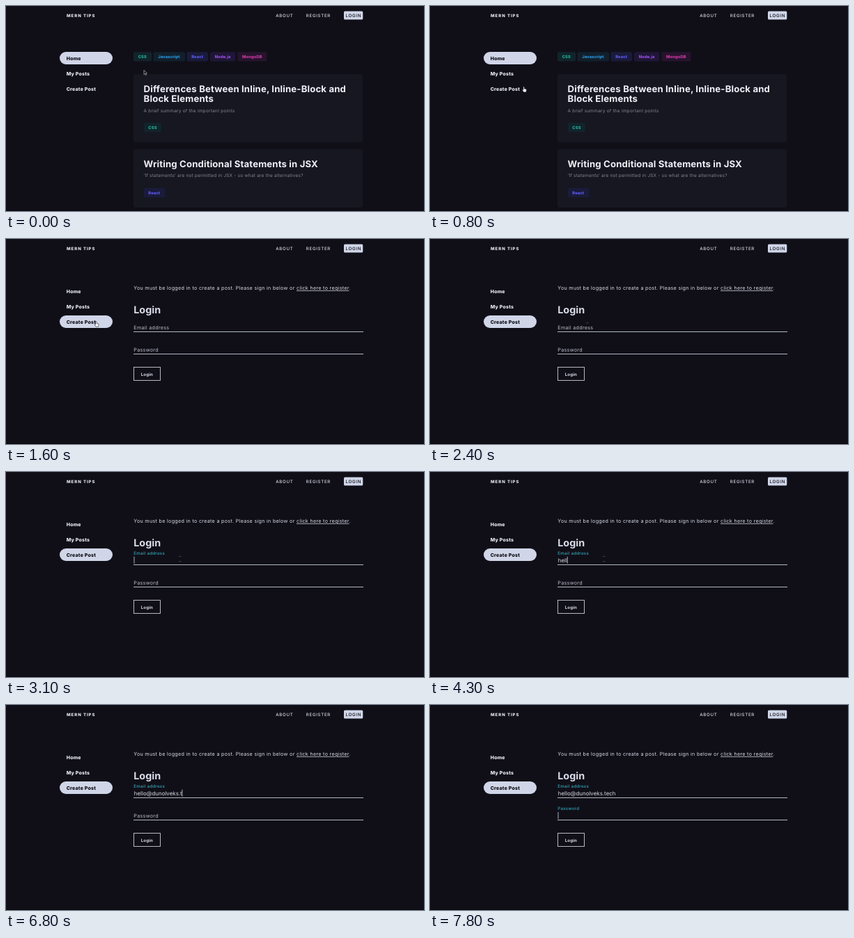
Animation, 600 px wide and 295 px high, one loop 8000 ms. Source, as an HTML page:

```html
<!DOCTYPE html>
<html lang="en">
<head>
<meta charset="utf-8">
<title>MERN Tips</title>
<style>
  html, body { margin: 0; width: 100%; height: 100%; overflow: hidden; background: #100f18; }
  svg { display: block; width: 100%; height: 100%; }
  text { font: 400 7.2px Inter, sans-serif; letter-spacing: .29px; fill: #d8dbe7;
         text-rendering: geometricPrecision; white-space: pre; }
  .brand { font-size: 6px; font-weight: 800; letter-spacing: .95px; fill: #e6e8f2; }
  .menu { font-size: 6.2px; font-weight: 500; letter-spacing: .68px; }
  .nav { font-size: 7px; font-weight: 800; letter-spacing: .2px; fill: #e9ebf5; }
  .title { font-size: 13.2px; font-weight: 700; letter-spacing: .14px; fill: #eef0fa; }
  .sub { font-size: 6.5px; letter-spacing: .21px; fill: #858792; }
  .tag { font-size: 5.8px; font-weight: 800; letter-spacing: .1px; }
  .heading { font-size: 14.4px; font-weight: 700; letter-spacing: 0; }
  .button { font-size: 6.1px; font-weight: 700; letter-spacing: .15px; }
  .typed { font-size: 7.95px; letter-spacing: 0; }
  .link { text-decoration: underline; text-decoration-thickness: .6px; }
  .dark { fill: #0c0b13; }
  .card { fill: #161720; }
  .light { fill: #d0d6e8; }
  .line { fill: #b4b7c4; }
  .pointer { stroke-linejoin: round; }
  #arrow { fill: #0b0b10; stroke: #d4d4da; stroke-width: .6; }
  #hand { fill: #f2f2f6; stroke: #23232c; stroke-width: .6; }
  #beam { fill: none; stroke: #4c4c58; stroke-width: .8; }
</style>
</head>
<body>
<svg viewBox="0 0 600 295">
  <rect width="600" height="295" fill="#100f18"/>
  <rect y="294" width="600" height="1" fill="#050508"/>

  <text class="brand" x="87" y="16">MERN TIPS</text>
  <text class="menu" x="387.3" y="16.1">ABOUT</text>
  <text class="menu" x="430.8" y="16.1">REGISTER</text>
  <rect class="light" x="485" y="7.6" width="27.3" height="12" rx="1.5"/>
  <text class="menu dark" x="487.6" y="16">LOGIN</text>

  <rect class="light" id="pill" x="77" width="76" height="18" rx="9"/>
  <text class="nav" id="home" x="86.7" y="77.7">Home</text>
  <text class="nav" x="86.7" y="99.7">My Posts</text>
  <text class="nav" id="create" x="86.7" y="121.7">Create Post</text>

  <g id="postsPage">
    <rect class="card" x="183" y="98" width="329" height="98" rx="2"/>
    <text class="title" x="197.6" y="124">Differences Between Inline, Inline-Block and</text>
    <text class="title" x="197.6" y="137.5">Block Elements</text>
    <text class="sub" x="197.6" y="152.8">A brief summary of the important points</text>
    <rect class="card" x="183" y="206" width="329" height="84" rx="2"/>
    <text class="title" x="197.6" y="231.5">Writing Conditional Statements in JSX</text>
    <text class="sub" x="197.6" y="246.3">‘If statements’ are not permitted in JSX - so what are the alternatives?</text>
    <g id="tags"></g>
  </g>

  <g id="loginPage">
    <text x="183.3" y="73.2">You must be logged in to create a post. Please sign in below or <tspan class="link">click here to register</tspan>.</text>
    <text class="heading" x="183.2" y="107">Login</text>
    <text id="emailLabel" x="183.3">Email address</text>
    <text class="typed" id="email" x="183.8" y="130"></text>
    <rect class="line" x="183" y="133" width="330" height="1"/>
    <text id="passwordLabel" x="183.3">Password</text>
    <rect class="line" x="183" y="165" width="330" height="1"/>
    <rect class="light" id="caret" width=".8" height="10"/>
    <rect x="183.5" y="184.5" width="38" height="19" fill="none" stroke="#c9ccd8" stroke-width=".9"/>
    <text class="button" x="193.7" y="196.7">Login</text>
  </g>

  <g id="cursor">
    <path class="pointer" id="arrow" d="M0 0V6.4L1.5 5.1L2.5 7.3L3.5 6.8L2.6 4.7H4.5Z"/>
    <path class="pointer" id="hand" d="M-1.7 -3.4Q-.9 -4.2 -.2 -3.4V-.9L2.3 -.3Q3 0 2.9 .9L2.3 4H-1.2L-3.2 .9Q-3.1 -.1 -2.3 .4L-1.7 1Z"/>
    <path id="beam" d="M-1.8 -3.6H1.8M-1.8 3.6H1.8"/>
  </g>
</svg>
<script>
const LOOP = 8000, OPEN_LOGIN = 1600, FOCUS_EMAIL = 2870, FOCUS_PASSWORD = 7380, BLINK = 500;
const EMAIL = 'hello@dunolveks.tech';
const KEY_TIMES = [3800, 4000, 4100, 4300, 4500, 5000, 5400, 5500, 5600, 5700,
                   5800, 5900, 6000, 6050, 6100, 6500, 6800, 6900, 7000, 7100];
const TAG_COLORS = {
  CSS: { text: '#22b59b', back: '#12242b' },
  Javascript: { text: '#2d9ae2', back: '#11202d' },
  React: { text: '#605cf2', back: '#1a1b3c' },
  'Node.js': { text: '#a24ff2', back: '#1f1637' },
  MongoDB: { text: '#cf3ba8', back: '#26132c' },
};

const el = id => document.getElementById(id);
const clamp = v => Math.max(0, Math.min(1, v));
const progress = (t, from, to) => clamp((t - from) / (to - from));
const easeInOut = p => p < .5 ? 4 * p ** 3 : 1 - (2 - 2 * p) ** 3 / 2;
const mix = (a, b, p) => a + (b - a) * p;
const show = (id, on) => el(id).setAttribute('visibility', on ? 'inherit' : 'hidden');

function addTag(name, x, y, width) {
  const { text, back } = TAG_COLORS[name];
  el('tags').innerHTML +=
    `<rect x="${x}" y="${y}" width="${width}" height="13.4" rx="2" fill="${back}"/>
     <text class="tag" x="${x + 6.7}" y="${y + 8.9}" style="fill:${text}">${name}</text>`;
}
addTag('CSS', 183, 66.2, 26);
addTag('Javascript', 211.5, 66.2, 45.5);
addTag('React', 259.5, 66.2, 30.5);
addTag('Node.js', 293, 66.2, 36.3);
addTag('MongoDB', 332.3, 66.2, 42.2);
addTag('CSS', 197.6, 168.2, 25.5);
addTag('React', 197.6, 261.8, 30.7);

// Floating label: shrinks and rises once its field has focus.
function floatLabel(id, restY, t, focus) {
  const p = 1 - (1 - progress(t, focus, focus + 250)) ** 2;
  const label = el(id);
  label.setAttribute('y', mix(restY, restY - 10.8, p));
  label.style.fontSize = mix(7.2, 6.15, p) + 'px';
  label.style.fontWeight = p > 0 ? 500 : 400;
  label.style.fill = p > 0 ? '#36a6ba' : '#b9bcc9';
}

function drawCaret(t, typedCount) {
  const inPassword = t >= FOCUS_PASSWORD;
  const lastInput = typedCount ? KEY_TIMES[typedCount - 1] : FOCUS_EMAIL;
  const lit = Math.floor((t - lastInput) / BLINK) % 2 === 0;
  show('caret', t >= FOCUS_EMAIL && (inPassword || lit));
  el('caret').setAttribute('x', 183.6 + (inPassword ? 0 : el('email').getComputedTextLength()));
  el('caret').setAttribute('y', inPassword ? 154 : 121.7);
}

function drawCursor(t) {
  const toLink = easeInOut(progress(t, 0, 1100));
  const toField = easeInOut(progress(t, 1800, 2750));
  const x = mix(mix(198, 130.2, toLink), 249.5, toField);
  const y = mix(mix(92.2, 122.3, toLink), 125, toField);
  el('cursor').setAttribute('transform', `translate(${x} ${y})`);
  const overLink = x < 153 && y > 109;
  const overField = t >= OPEN_LOGIN && x > 183;
  show('hand', overLink);
  show('beam', overField);
  show('arrow', !overLink && !overField);
  show('cursor', t < 6000);
}

function draw(t) {
  const login = t >= OPEN_LOGIN;
  show('postsPage', !login);
  show('loginPage', login);
  el('pill').setAttribute('y', login ? 110 : 66);
  el('home').classList.toggle('dark', !login);
  el('create').classList.toggle('dark', login);

  const typedCount = KEY_TIMES.filter(time => time <= t).length;
  el('email').textContent = EMAIL.slice(0, typedCount);
  floatLabel('emailLabel', 130, t, FOCUS_EMAIL);
  floatLabel('passwordLabel', 162, t, FOCUS_PASSWORD);
  drawCaret(t, typedCount);
  drawCursor(t);
}

const start = performance.now();
function tick() {
  draw((performance.now() - start) % LOOP);
  requestAnimationFrame(tick);
}
tick();
</script>
</body>
</html>
```
